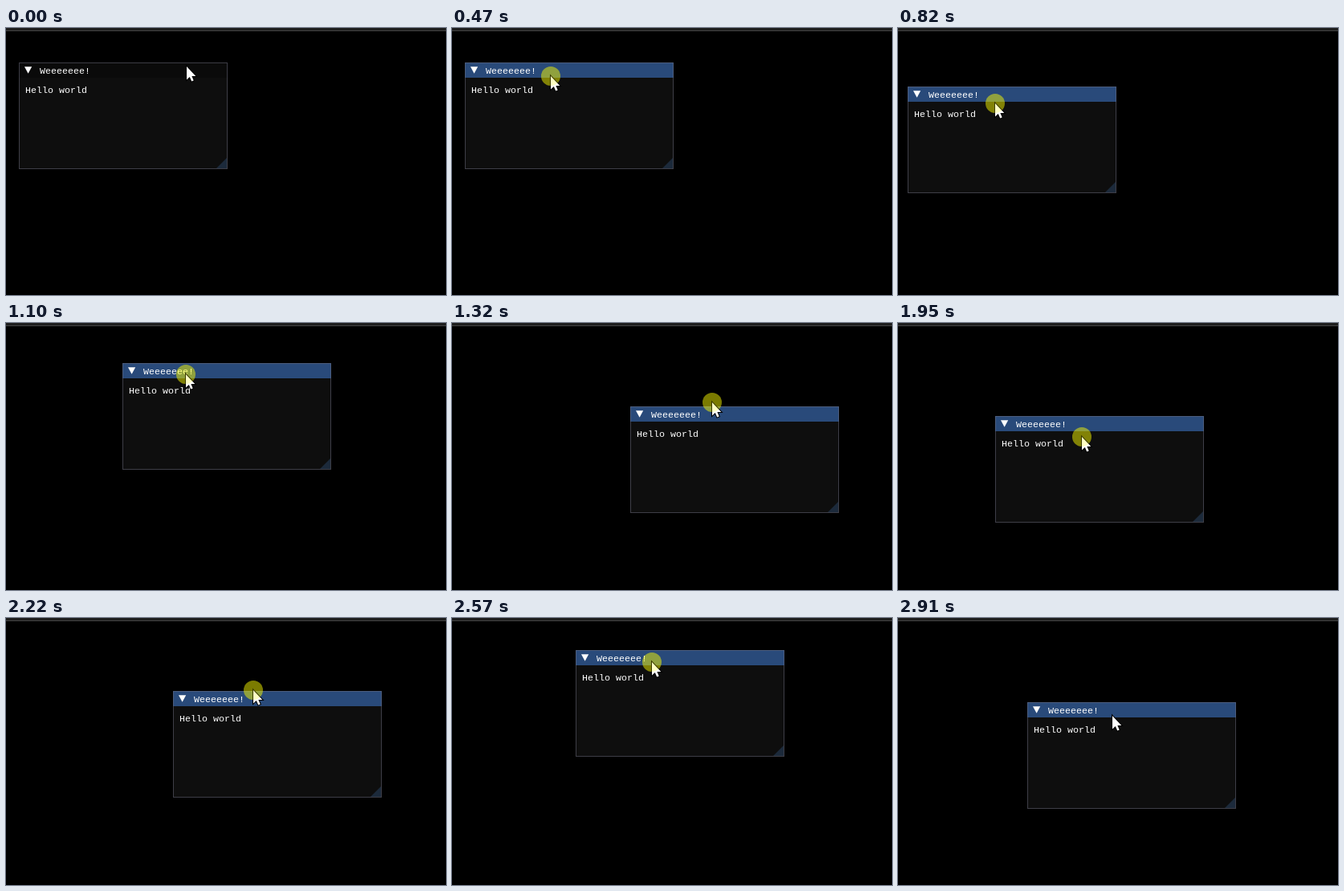
These frames come from a looping animation (548 by 333 pixels, 2.98 s). An HTML page with a canvas:

```html
<!DOCTYPE html>
<html lang="en">
<head>
<meta charset="utf-8">
<title>Dragged window</title>
<style>
  html, body { margin: 0; width: 100%; height: 100%; overflow: hidden; background: #000; }
  canvas { display: block; }
</style>
</head>
<body>
<canvas id="stage" width="548" height="333"></canvas>
<script>
const ctx = document.getElementById('stage').getContext('2d');
const TAU = Math.PI * 2;
const LOOP = 2980, STEP = 70;
const ARRIVE = 280, PRESS = 350, RELEASE = 2880;
const W = 260, H = 133, BAR = 19;
const GRAB = { x: 106, y: 17 };   // pointer position inside the window
const LAG = 25;                   // ms the window trails the pointer
const SQUASH = .85;               // height of a swirl against its width

const beats = [0, 540, 1250, 2220, 2770];

// The window is swung in circles. Each key: time, window place,
// swirl radius and turns so far (0 = right, .25 = top).
const keys = [
  [420, 16, 43, 0, 1.05],
  [820, 12, 73, 45, .5],
  [1320, 222, 104, 58, 2],
  [1670, 243, 96, 58, 3.06],
  [2220, 208, 91, 52, 4],
  [2570, 154, 40, 30, 5.17],
  [2840, 161, 105, 25, 5.7]
].map(([t, x, y, r, turn]) => {
  const o = swirl(r, turn);
  return { t, r, turn, x: x - o.x, y: y - o.y };   // x, y: swirl centre
});

function swirl(r, turn) {
  return { x: r * Math.cos(TAU * turn), y: -r * SQUASH * Math.sin(TAU * turn) };
}

// Smooth slope that is flat at the ends and wherever the value turns back.
function slope(i, name) {
  if (i === 0 || i === keys.length - 1) return 0;
  const rate = j => (keys[j + 1][name] - keys[j][name]) / (keys[j + 1].t - keys[j].t);
  const a = rate(i - 1), b = rate(i);
  return a * b > 0 ? 2 * a * b / (a + b) : 0;
}

function value(t, name) {
  let i = 0;
  while (i < keys.length - 2 && t >= keys[i + 1].t) i++;
  const a = keys[i], b = keys[i + 1], d = b.t - a.t;
  const u = Math.min(Math.max((t - a.t) / d, 0), 1);
  const m = slope(i, name) * d, n = slope(i + 1, name) * d, g = b[name] - a[name];
  return a[name] + u * (m + u * (3 * g - 2 * m - n + u * (m + n - 2 * g)));
}

function windowAt(t) {
  const o = swirl(value(t, 'r'), value(t, 'turn'));
  return { x: Math.round(value(t, 'x') + o.x), y: Math.round(value(t, 'y') + o.y) };
}

function pointerAt(t) {
  if (t >= PRESS) {
    const w = windowAt(t + LAG);
    return { x: w.x + GRAB.x, y: w.y + GRAB.y };
  }
  const u = Math.min(t / ARRIVE, 1), e = u * u * (3 - 2 * u);
  return {
    x: Math.round(225 - 103 * e),
    y: Math.round(48 + 12 * e - 9 * Math.sin(Math.PI * u))
  };
}

function tick(t) {
  const start = beats.filter(b => b <= t).pop();
  return start + Math.floor((t - start) / STEP) * STEP;
}

function poly(points, fill) {
  ctx.beginPath();
  points.forEach(([x, y]) => ctx.lineTo(x, y));
  ctx.closePath();
  ctx.fillStyle = fill;
  ctx.fill();
}

function rect(x, y, w, h, fill) {
  ctx.fillStyle = fill;
  ctx.fillRect(x, y, w, h);
}

function disc(alpha) {
  ctx.beginPath();
  ctx.arc(0, 0, 12, 0, TAU);
  ctx.fillStyle = `rgba(255,255,0,${alpha})`;
  ctx.fill();
}

function drawWindow({ x, y }, active) {
  ctx.save();
  ctx.translate(x, y);
  rect(0, 0, W, H, '#0e0e0e');
  rect(0, 0, W, BAR, active ? '#294a7a' : '#0a0a0a');
  poly([[W - 1, H - 14], [W - 1, H - 1], [W - 14, H - 1]], '#1c2a3b');
  ctx.strokeStyle = 'rgba(110,110,128,.5)';
  ctx.lineWidth = 1;
  ctx.strokeRect(.5, .5, W - 1, H - 1);
  poly([[7, 5.3], [16.2, 5.3], [11.6, 13.7]], '#fff');
  ctx.fillStyle = '#fff';
  ctx.font = '11.667px "Liberation Mono", monospace';
  ctx.fillText('Weeeeeee!', 26, 14);
  ctx.fillText('Hello world', 8, 38);
  ctx.restore();
}

function drawPointer({ x, y }, pressed) {
  ctx.save();
  ctx.translate(x, y);
  if (pressed) disc(.33);
  poly([[0, 0], [0, 16.5], [3.8, 13], [6.2, 18.5], [8.7, 17.4], [6.4, 12], [11.3, 12]], '#fff');
  ctx.strokeStyle = '#000';
  ctx.lineWidth = 2;
  ctx.stroke();
  ctx.fill();
  if (pressed) disc(.23);
  ctx.restore();
}

function draw(now) {
  const t = tick(now % LOOP);
  const active = t >= PRESS;
  rect(0, 0, 548, 333, '#000');
  rect(0, 0, 548, 3, '#1e1e1e');
  rect(0, 3, 548, 1, '#434343');
  drawWindow(windowAt(t), active);
  drawPointer(pointerAt(t), active && t < RELEASE);
}

const begin = performance.now();
function loop() {
  draw(performance.now() - begin);
  requestAnimationFrame(loop);
}
loop();
</script>
</body>
</html>
```
